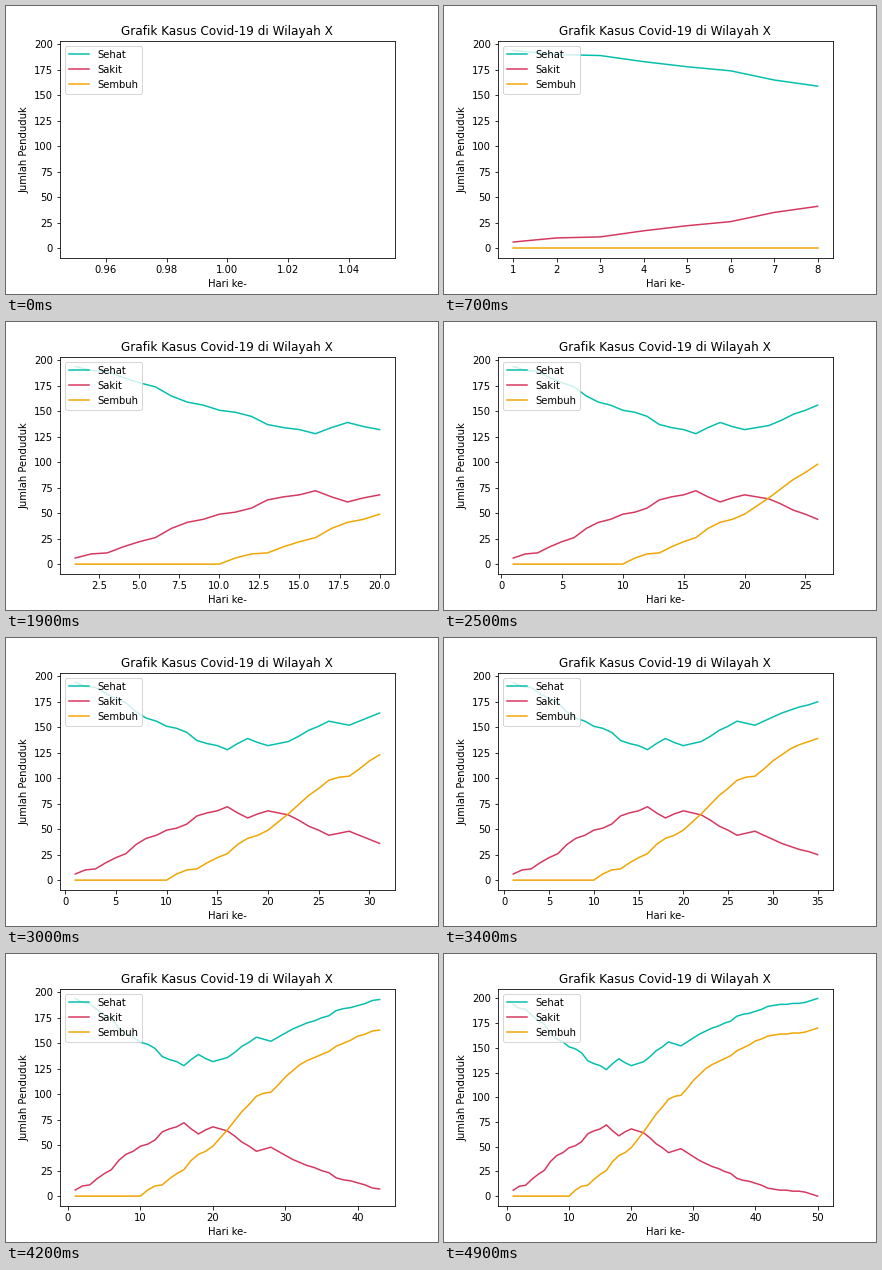
Animation of 432 by 288 pixels, one loop 5 s. Source, as a matplotlib script:

```python
import matplotlib.pyplot as plt
import numpy as np
from matplotlib.animation import FuncAnimation

POPULATION = 200
RECOVERY_DAYS = 10
DAYS = 50

plt.rcParams["font.family"] = "DejaVu Sans"

# New infections per day; everyone recovers after RECOVERY_DAYS.
new_cases = np.zeros(DAYS, dtype=int)
daily = [6, 4, 1, 6, 5, 4, 9, 6, 3, 5,
         8, 8, 9, 9, 7, 8, 3, 1, 7, 8,
         6, 6, 4, 3, 3, 3, 5, 3, 3, 4,
         2, 3, 1, 1, 0, 1, 0, 1, 2, 2]
new_cases[:len(daily)] = daily

days = np.arange(1, DAYS + 1)
infected = np.cumsum(new_cases)
recovered = np.concatenate([np.zeros(RECOVERY_DAYS, dtype=int),
                            infected[:-RECOVERY_DAYS]])
sick = infected - recovered
healthy = POPULATION - sick

fig, ax = plt.subplots(figsize=(6, 4), dpi=72)
fig.subplots_adjust(left=0.125, right=0.9, bottom=0.125, top=0.88)
ax.set_title("Grafik Kasus Covid-19 di Wilayah X")
ax.set_xlabel("Hari ke-")
ax.set_ylabel("Jumlah Penduduk")

series = [
    ("Sehat", healthy, "#03bfac"),
    ("Sakit", sick, "#d6375e"),
    ("Sembuh", recovered, "#f0a500"),
]
lines = [ax.plot([], [], color=color, label=label)[0]
         for label, _, color in series]
ax.legend(loc="upper left")


def update(frame):
    count = frame + 1
    for line, (_, values, _) in zip(lines, series):
        line.set_data(days[:count], values[:count])
    ax.relim()
    ax.autoscale_view()
    return lines


anim = FuncAnimation(fig, update, frames=DAYS, interval=100,
                     repeat=True, repeat_delay=0, blit=False)
plt.show()
```
